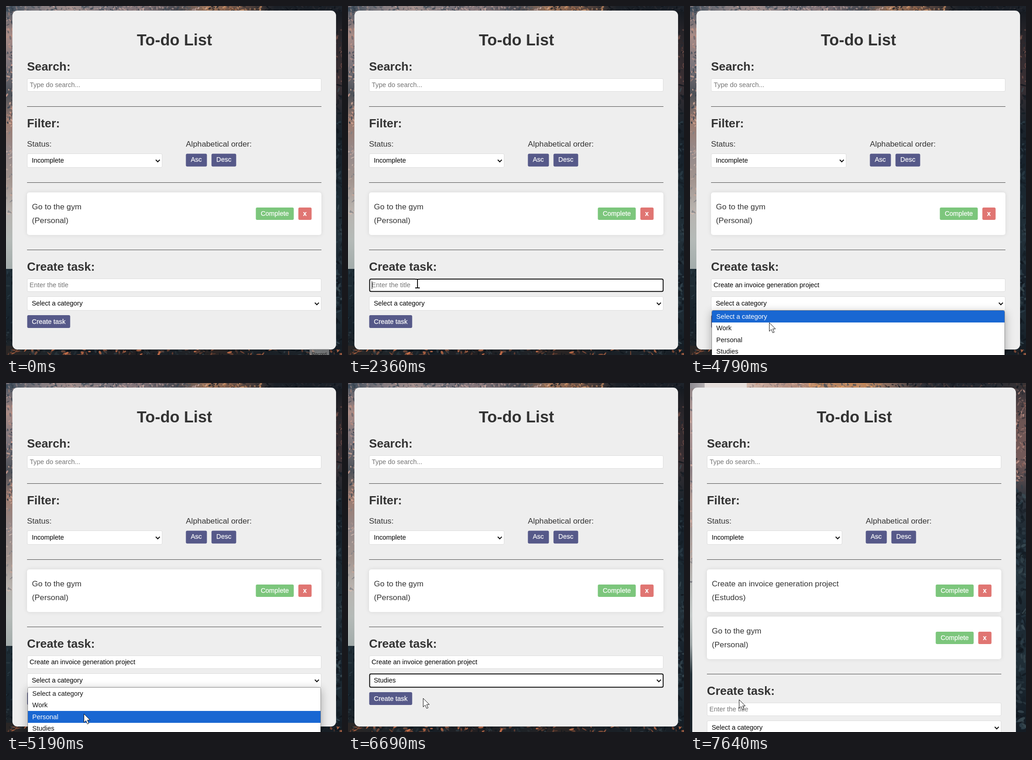
Animation, 735 px wide and 762 px high, one loop 8000 ms. Source, as an HTML page with a canvas:

```html
<!DOCTYPE html>
<html lang="en">
<head>
<meta charset="utf-8">
<title>To-do List</title>
<style>
html, body { margin: 0; width: 100%; height: 100%; overflow: hidden; background: #17222c; }
#stage { position: relative; width: 735px; height: 762px; overflow: hidden;
  font-family: "Liberation Sans", Arial, sans-serif; color: #333; }
#stage * { position: absolute; box-sizing: border-box; }
#stage .t { white-space: pre; line-height: normal; }
.card { background: #eee; border-radius: 11px; }
.field { background: #fff; border: 1px solid #ddd; border-radius: 3px; }
.ring { border: 2px solid #101010; border-radius: 4px; transform: translate(.4px, .3px); }
.item { background: #fff; border-radius: 5px; box-shadow: 0 0 10px rgba(0, 0, 0, .1); }
.btn { border-radius: 3px; opacity: .8; -webkit-text-stroke: .25px #fff; }
.hr { background: #4c4c4c; }
.popup { border-radius: 4px; border: 1px solid rgba(0, 0, 0, .42);
  box-shadow: 0 5px 20px rgba(0, 0, 0, .3); }
.click { border-radius: 50%; background: rgba(255, 255, 0, .53); }
.tip { background: rgba(150, 150, 150, .7); }
svg { overflow: visible; }
</style>
</head>
<body>
<div id="stage"></div>
<script>
const LOOP = 8000, SMALL = 14.4, BASE = 17.28, H2 = 25.92, H1 = 34.56;
const TITLE = 'Create an invoice generation project';
const stage = document.getElementById('stage');

// ---------- builders ----------
function add(parent, tag, cls) {
  const el = document.createElement(tag);
  el.className = cls || '';
  return parent.appendChild(el);
}
function box(parent, cls, x, y, w, h, fill) {
  const el = add(parent, 'div', cls);
  Object.assign(el.style, { left: x + 'px', top: y + 'px', width: w + 'px', height: h + 'px' });
  if (fill) el.style.background = fill;
  return el;
}
const group = (parent) => box(parent, '', 0, 0, 735, 762);

function text(parent, str, x, baseline, size, opt = {}) {
  const el = add(parent, 'div', 't');
  el.textContent = str;
  Object.assign(el.style, {
    left: x + 'px', top: baseline - Math.round(size * .905) + 'px', fontSize: size + 'px',
    color: opt.color || '', fontWeight: opt.bold ? 'bold' : 'normal'
  });
  if (opt.width) Object.assign(el.style, { width: opt.width + 'px', textAlign: 'center' });
  return el;
}
// Placed by transform so that fractional positions are kept.
function button(parent, label, x, y, w, h, baseline, fill, bold) {
  const el = box(parent, 'btn', 0, 0, w, h, fill);
  el.style.transform = `translate(${x}px,${y}px)`;
  text(el, label, 0, baseline - y, SMALL, { color: '#fff', width: w, bold });
  return el;
}
function shape(parent, d, attrs) {
  const ns = 'http://www.w3.org/2000/svg';
  const svg = parent.appendChild(document.createElementNS(ns, 'svg'));
  svg.setAttribute('width', 1);
  svg.setAttribute('height', 1);
  attrs.forEach(a => {
    const p = svg.appendChild(document.createElementNS(ns, 'path'));
    p.setAttribute('d', d);
    for (const k in a) p.setAttribute(k, a[k]);
  });
  return svg;
}
function chevron(parent, x, y) {
  const s = shape(parent, 'M-4.4 -2.3L0 2.2L4.4 -2.3', [{ fill: 'none', stroke: '#111', 'stroke-width': 2 }]);
  s.style.left = x + 'px';
  s.style.top = y + 'px';
}
function item(parent, y, title, note) {
  box(parent, 'item', 46, y, 644, 93);
  text(parent, title, 56.8, y + 37, BASE);
  text(parent, note, 56.8, y + 67, BASE);
  button(parent, 'Complete', 546.5, y + 33, 83, 27, y + 51, '#5cb85c');
  button(parent, 'x', 639.5, y + 33, 28.5, 27, y + 51, '#d9534f', true);
}

// ---------- forest backdrop ----------
function random(seed) {
  return () => (seed = (seed * 16807) % 2147483647) / 2147483647;
}
function wash(g, x, y, w, h, tones) {
  const fill = w > h ? g.createLinearGradient(x, 0, x + w, 0) : g.createLinearGradient(0, y, 0, y + h);
  tones.split(' ').forEach((c, i, all) => fill.addColorStop(i / (all.length - 1), '#' + c));
  g.fillStyle = fill;
  g.fillRect(x, y, w, h);
}
function leaves(g, rnd, x, y, w, h, n, colors, size = 3) {
  const list = colors.split(' ');
  g.save();
  g.beginPath();
  g.rect(x, y, w, h);
  g.clip();
  for (let i = 0; i < n; i++) {
    g.globalAlpha = .3 + rnd() * .6;
    g.fillStyle = '#' + list[Math.floor(rnd() * list.length)];
    g.beginPath();
    g.ellipse(x + rnd() * w, y + rnd() * h, size * (.6 + rnd()), size * (.25 + rnd() * .4), rnd() * 3.1, 0, 7);
    g.fill();
  }
  g.restore();
}
function backdrop(seed, paint) {
  const c = add(stage, 'canvas');
  c.width = 735;
  c.height = 762;
  c.style.left = c.style.top = 0;
  paint(c.getContext('2d'), random(seed));
  return c;
}
const DARK = '0f161d 2c3e49 3a4a52 141d25';
const bgA = backdrop(71, (g, r) => {
  wash(g, 0, 0, 26, 574, '46525f a98c87 7c757b 4d5158 9c7d72 94898a a3958f b8b4b0 b4bab7 a3acab');
  wash(g, 0, 574, 26, 188, '1f2e37 1a272f 16212a 222629');
  leaves(g, r, 0, 10, 26, 260, 130, 'd8a394 3a4654 c58f7c 2d3945 e0b3a0');
  leaves(g, r, 0, 270, 26, 190, 50, 'c9a597 7d7f84 d5bdb2');
  leaves(g, r, 0, 575, 26, 175, 60, DARK);
  wash(g, 710, 0, 25, 762, '12181f 2f292d 3a3034 1c242c 17222c 1b2932 223039 16202a 1d2a33 131b23');
  leaves(g, r, 710, 50, 25, 120, 50, '6d4b45 151c24 7f5850 232a33');
  leaves(g, r, 710, 170, 25, 580, 170, DARK, 5);
  wash(g, 0, 0, 735, 12, '3c4a58 827b80 a08e8c 77727a 857478 4a4a52 957059 5f4a42 1b2027 181d24 1c2129');
  leaves(g, r, 0, 0, 440, 12, 190, 'c9a9a0 37434f a8908f 4d5863');
  leaves(g, r, 430, 0, 130, 12, 70, 'd89d70 a8714f 24262c');
  leaves(g, r, 560, 0, 175, 12, 60, '0f141b 2c2b30 20272f');
  wash(g, 0, 742, 735, 20, '2b2625 1d2429 181f26 221f21 1b2127 2a2423 191f25 1c2329 161d24');
  leaves(g, r, 0, 750, 735, 12, 190, 'c9704a 10171d 8a4f38 2f3b42 11181e', 4);
});
const bgB = backdrop(37, (g, r) => {
  wash(g, 0, 0, 16, 762, '8a8285 b39b98 a79292 8d8084 b09a94 a59b9a b3aaa6 b9bbb9 c6cbca 9ea6a7 25323a 18242c 1a2229');
  leaves(g, r, 0, 10, 16, 440, 90, 'd2aea3 6b6d76 bd9a90');
  wash(g, 700, 0, 35, 762, '2a2a31 6d5553 735a59 2d343d 1d2a33 25343d 1a262f 22313a 18232c 141c24');
  leaves(g, r, 700, 0, 35, 215, 190, 'a47c74 1c232c 8a6057 c09488 2b313a');
  leaves(g, r, 700, 215, 35, 547, 220, DARK, 6);
  wash(g, 0, 0, 735, 12, '8d8a90 e6dfdc c9aea2 b18d80 a98068 c08a62 80675d 2a2c33 20242c 272a31 3a3334');
  g.fillStyle = '#e6dfdc';
  g.fillRect(32, 0, 92, 12);
  leaves(g, r, 125, 0, 140, 12, 70, 'd9b5a5 8c7a7b c79a87');
  leaves(g, r, 260, 0, 165, 12, 110, 'e0a06a 4a5058 c98650');
  leaves(g, r, 425, 0, 310, 12, 110, '12171e 5a443f 2d343d');
});

// ---------- page ----------
const page = group(stage);
const card = box(page, 'card', 14, 10, 708, 740);
text(page, 'To-do List', 14.5, 86, H1, { bold: true, width: 708 });

text(page, 'Search:', 46, 141, H2, { bold: true });
box(page, 'field', 46, 158, 644, 29);
text(page, 'Type do search...', 52, 177, SMALL, { color: '#757575' });
box(page, 'hr', 46, 219, 644, 1);

text(page, 'Filter:', 46, 265, H2, { bold: true });
text(page, 'Status:', 46, 307, BASE);
box(page, 'field', 46, 322, 296, 31);
text(page, 'Incomplete', 56.4, 342, SMALL, { color: '#000' });
chevron(page, 332, 338);
text(page, 'Alphabetical order:', 393.6, 307, BASE);
button(page, 'Asc', 393.5, 322.4, 45.5, 28, 340.4, '#313571');
button(page, 'Desc', 449.5, 322.4, 54, 28, 340.4, '#313571');
box(page, 'hr', 46, 385, 644, 1);

const listA = group(page), listB = group(page);
item(listA, 407, 'Go to the gym', '(Personal)');
item(listB, 407, TITLE, '(Estudos)');
item(listB, 510, 'Go to the gym', '(Personal)');

const form = group(page);
box(form, 'hr', 46, 532, 644, 1);
text(form, 'Create task:', 46, 578, H2, { bold: true });
box(form, 'field', 46, 595, 644, 29);
const hint = text(form, 'Enter the title', 51.6, 614, SMALL, { color: '#757575' });
const typed = text(form, TITLE, 51.6, 614, SMALL, { color: '#000' });
const titleRing = box(form, 'ring', 46, 595, 644, 29);
const caret = box(form, '', 52, 601, 1, 17, '#000');
box(form, 'field', 46, 634, 644, 31);
const chosen = text(form, '', 56.4, 654, SMALL, { color: '#000' });
chevron(form, 680, 650);
const selectRing = box(form, 'ring', 46, 634, 644, 31);
const create = button(form, 'Create task', 46.4, 675, 94, 28, 694, '#313571');

// ---------- dropdown ----------
const popup = box(stage, 'popup', 47, 664, 642, 128);
const sheet = box(popup, '', 0, 0, 640, 126, '#fff');
sheet.style.borderRadius = '3px';
sheet.style.overflow = 'hidden';
const rows = ['Select a category', 'Work', 'Personal', 'Studies'].map((label, i) => {
  const bar = box(sheet, '', 0, i * 25.3, 640, 26, '#1967d2');
  const name = text(sheet, label, 9.6, [18, 43, 69, 94][i], SMALL);
  return { bar, name };
});

// ---------- pointer ----------
const tip = box(stage, 'tip', 664, 749, 43, 13);
tip.style.overflow = 'hidden';
text(tip, 'Record', 5, 15, 10, { color: '#222' });
const halo = box(stage, 'click', -16, -16, 32, 32);
const arrow = shape(stage, 'M.5 .5V19.2L4.8 15.2L8.1 22.6L11.2 21.2L8 14H14Z',
  [{ fill: '#fff', stroke: '#111', 'stroke-width': 1 }]);
const beamLine = 'M-5 -9.5H-1L0 -8.5L1 -9.5H5M0 -8.5V8.5M-5 9.5H-1L0 8.5L1 9.5H5';
const beam = shape(stage, beamLine, [
  { fill: 'none', stroke: '#fff', 'stroke-width': 3.4 },
  { fill: 'none', stroke: '#000', 'stroke-width': 1.8 }
]);
arrow.style.left = arrow.style.top = beam.style.left = beam.style.top = 0;

// time, x, y
const path = [
  [70, 690, 748], [300, 500, 722], [560, 340, 694], [730, 243, 658], [870, 179, 625],
  [940, 168, 612], [1080, 152, 606], [3500, 152, 606], [3850, 173, 650], [4560, 173, 650],
  [4790, 173, 691], [5050, 172, 712], [5330, 168, 732], [5510, 168, 732], [5670, 155, 743],
  [5880, 152, 748], [6430, 152, 748], [6690, 164, 688], [6890, 107, 692], [7100, 107, 691]
];
// time, highlighted row
const marks = [[0, 0], [4860, 1], [5190, 2], [5600, 3]];

function place(t) {
  const i = path.findIndex(p => p[0] > t);
  if (i < 0) return path[path.length - 1].slice(1);
  if (i === 0) return path[0].slice(1);
  const [t0, x0, y0] = path[i - 1], [t1, x1, y1] = path[i];
  const k = (t - t0) / (t1 - t0);
  return [x0 + (x1 - x0) * k, y0 + (y1 - y0) * k];
}
const within = (t, ...spans) => spans.some(([a, b]) => t >= a && t < b);
const show = (el, on) => { el.style.display = on ? '' : 'none'; };

function render(t) {
  const done = t >= 7570;
  show(bgA, !done);
  show(bgB, done);
  show(listA, !done);
  show(listB, done);
  page.style.transform = done ? 'translateX(-9px)' : '';
  form.style.transform = done ? 'translateY(103px)' : '';
  card.style.height = done ? '843px' : '740px';

  show(hint, t < 3100 || done);
  show(typed, t >= 3100 && !done);
  show(titleRing, within(t, [1150, 4050]));
  show(caret, within(t, [1290, 1820], [2360, 2830], [3100, 3600]));
  caret.style.left = t < 3100 ? '52px' : '282px';
  chosen.textContent = within(t, [6220, 7570]) ? 'Studies' : 'Select a category';
  show(selectRing, within(t, [6220, 7500]));
  create.style.opacity = done ? .8 : .8 + .2 * Math.min(1, Math.max(0, (t - 6820) / 280));

  show(popup, within(t, [4050, 6290]));
  popup.style.opacity = t >= 6220 ? .4 : 1;
  sheet.style.opacity = t < 4120 ? 0 : t < 4180 ? .6 : 1;
  const row = marks.filter(m => m[0] <= t).pop()[1];
  rows.forEach((r, i) => {
    show(r.bar, i === row);
    r.name.style.color = i === row ? '#fff' : '#111';
  });

  const [x, y] = place(t);
  const overText = within(t, [900, 3690]) && y < 624;
  const move = `translate(${Math.round(x)}px,${Math.round(y)}px)`;
  [halo, arrow, beam].forEach(el => { el.style.transform = move; });
  show(tip, t < 140);
  show(arrow, t >= 70 && !overText);
  show(beam, overText);
  show(halo, within(t, [1150, 1290], [4050, 4180], [6150, 6290], [7500, 7640]));
}

const start = performance.now();
function tick() {
  render((performance.now() - start) % LOOP);
  requestAnimationFrame(tick);
}
tick();
</script>
</body>
</html>
```
